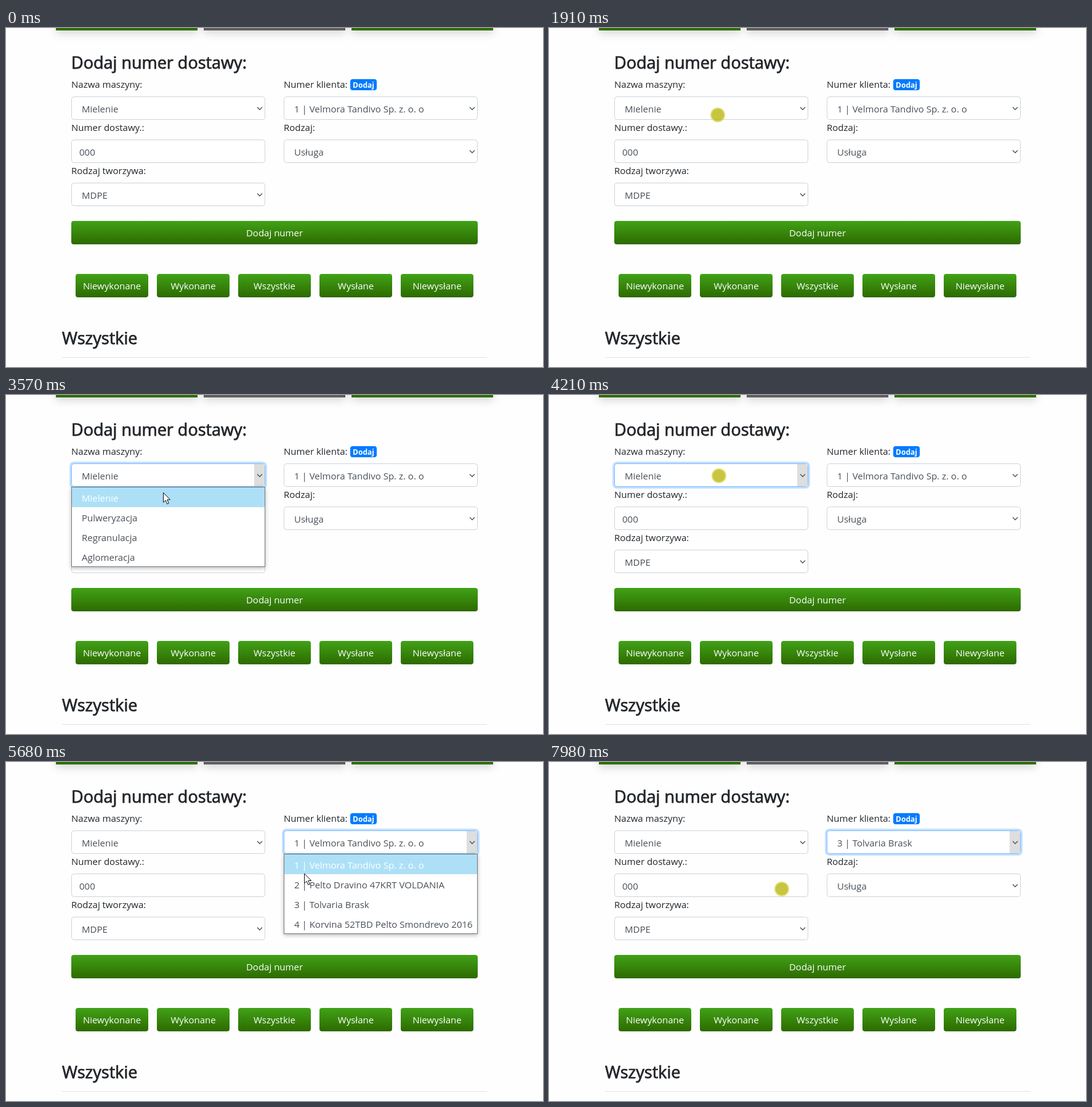
An HTML page that plays this animation: 872x550 px, repeating every 8 s.

```html
<!DOCTYPE html>
<html lang="pl">
<head>
<meta charset="utf-8">
<title>Dodaj numer dostawy</title>
<style>
  html, body { margin: 0; width: 100%; height: 100%; overflow: hidden; background: #fefefe; }
  svg { display: block; width: 100%; height: 100%; }
  text { font: 15px "Open Sans", "Noto Sans", sans-serif; fill: #212529; white-space: pre; }
  .heading { font-size: 27px; stroke: #212529; stroke-width: .75; }
  .value { fill: #495057; }
  .light { fill: #fff; text-anchor: middle; }
  .badge { font-size: 12px; font-weight: 700; }
  .box { fill: #fff; stroke: #ced4da; }
  .button { fill: url(#green); }
  .bar { filter: drop-shadow(0 5px 7px rgba(0, 0, 0, .15)); }
  .chevron { fill: none; stroke: #4c5a57; stroke-width: 1.4; }
  .ring, .arrowBox { visibility: hidden; }
  .ring { fill: none; stroke: #bfdeff; stroke-width: 3.2; }
  .focus .ring, .focus .arrowBox { visibility: visible; }
  .focus .box { stroke: #80bdff; }
  .arrowBox { fill: #dedede; }
  .menu { filter: drop-shadow(0 2px 3px rgba(0, 0, 0, .28)); }
  .frame { fill: #fff; stroke: #737b83; }
  .option rect { fill: none; }
  .option.hover rect { fill: #ade0f7; }
  .option.hover text { fill: #fff; }
  #spot { fill: rgba(184, 180, 10, .77); stroke: rgba(224, 222, 104, .85); stroke-width: 2; }
  #spot.pressed { fill: rgba(112, 112, 112, .78); stroke: rgba(175, 175, 175, .8); }
  #arrow { fill: #fff; stroke: #111; }
</style>
</head>
<body>
<svg viewBox="0 0 872 550">
  <defs>
    <linearGradient id="green" x2="0" y2="1">
      <stop stop-color="#41a217"/><stop offset="1" stop-color="#2d6a00"/>
    </linearGradient>
  </defs>
  <g id="page"></g>
  <g id="menus"></g>
  <g id="pointer">
    <circle id="spot" r="11"/>
    <path id="arrow" d="M.5 .5V16.2L4.1 12.9L6.7 18.8L9.3 17.7L6.7 11.9H11.6Z"/>
  </g>
</svg>
<script>
const LOOP = 8000;
const $ = id => document.getElementById(id);
const machines = ['Mielenie', 'Pulweryzacja', 'Regranulacja', 'Aglomeracja'];
const clients = [
  '1 | Velmora Tandivo Sp. z. o. o',
  '2 | Pelto Dravino 47KRT VOLDANIA',
  '3 | Tolvaria Brask',
  '4 | Korvina 52TBD Pelto Smondrevo 2016'
];

const text = (x, y, label, cls = '') => `<text x="${x}" y="${y}" class="${cls}">${label}</text>`;
const rect = (x, y, w, h, cls, r = 0, extra = '') =>
  `<rect x="${x}" y="${y}" width="${w}" height="${h}" rx="${r}" class="${cls}" ${extra}/>`;
const button = (x, y, w, label) =>
  rect(x, y, w, 38, 'button', 4) + text(x + w / 2, y + 25, label, 'light');
const input = (x, y, value) =>
  rect(x + .5, y + .5, 314, 37, 'box', 4) + text(x + 13, y + 26, value, 'value');
const select = (id, x, y, value) => `<g id="${id}">
  ${rect(x - 1.2, y - 1.2, 317.4, 40.4, 'ring', 5)}
  ${rect(x + .5, y + .5, 314, 37, 'box', 4)}
  ${rect(x + 297, y + 1, 17, 36, 'arrowBox')}
  <path class="chevron" d="M${x + 302} ${y + 17.5}l4 4 4-4"/>
  ${text(x + 17, y + 26, value, 'value')}</g>`;
const menu = (id, x, y, options) => `<g id="${id}" class="menu">
  ${rect(x + .5, y + .5, 314, 129, 'frame')}
  ${options.map((label, i) => `<g class="option">
    ${rect(x + 1, y + 1 + 32 * i, 313, 32, '')}
    ${text(x + 17, y + 24 + 32 * i, label, 'value')}</g>`).join('')}</g>`;

const LEFT = 106, RIGHT = 451;
const rowLabels = ['Nazwa maszyny:', 'Numer dostawy.:', 'Rodzaj tworzywa:'];
const filters = ['Niewykonane', 'Wykonane', 'Wszystkie', 'Wysłane', 'Niewysłane'];

$('page').innerHTML = [
  ...['#2f6f02', '#625f62', '#2f6f02'].map((color, i) =>
    rect(81 + 240 * i, -34, 230, 38, 'bar', 0, `fill="${color}"`)),
  text(LEFT, 66, 'Dodaj numer dostawy:', 'heading'),
  ...rowLabels.map((label, i) => text(LEFT, 97 + 70 * i, label)),
  ...['Numer klienta:', 'Rodzaj:'].map((label, i) => text(RIGHT, 97 + 70 * i, label)),
  rect(559, 83, 43, 18, '', 4, 'fill="#007bff"'),
  text(580.5, 97, 'Dodaj', 'light badge'),
  select('machine', LEFT, 111, machines[0]),
  input(LEFT, 181, '000'),
  select('material', LEFT, 251, 'MDPE'),
  select('client', RIGHT, 111, clients[0]),
  select('kind', RIGHT, 181, 'Usługa'),
  button(LEFT, 313, 660, 'Dodaj numer'),
  ...filters.map((label, i) => button(113 + 132 * i, 399, 118, label)),
  text(91, 513, 'Wszystkie', 'heading'),
  rect(91, 534, 690, 1, '', 0, 'fill="#e4e4e4"')
].join('');
$('menus').innerHTML =
  menu('machineMenu', LEFT, 149, machines) + menu('clientMenu', RIGHT, 149, clients);

// Each move starts where the previous one ended; "via" bends it into a curve.
const start = [792, 548];
const moves = [
  { from: 320, until: 1100, to: [287, 162], via: [740, 370] },
  { from: 1130, until: 1290, to: [274, 141] },
  { from: 2480, until: 2980, to: [251, 188] },
  { from: 3430, until: 3570, to: [255, 158] },
  { from: 3720, until: 4240, to: [276, 131] },
  { from: 4240, until: 4850, to: [488, 136] },
  { from: 5460, until: 6110, to: [481, 215] },
  { from: 7440, until: 7980, to: [378, 206], via: [510, 214] }
];

// Press on the select, menu opens, arrow appears, highlight follows, option chosen, button released.
const picks = [
  { id: 'machine', press: 2050, open: 2140, arrow: 2480, hover: 2480, close: 3750, release: 3820 },
  { id: 'client', press: 5030, open: 5150, arrow: 5460, hover: 6250, close: 6800, release: 7470 }
];

const easeOut = k => 1 - (1 - k) ** 2;
const within = (t, from, until) => t >= from && t < until;
const show = (id, on) => $(id).style.visibility = on ? 'visible' : 'hidden';

function pointerAt(t) {
  let point = start;
  for (const { from, until, to, via } of moves) {
    if (t < from) break;
    const k = easeOut(Math.min(1, (t - from) / (until - from)));
    point = point.map((a, i) => {
      const bend = via ? via[i] : (a + to[i]) / 2;
      return a * (1 - k) ** 2 + 2 * bend * k * (1 - k) + to[i] * k * k;
    });
  }
  return point;
}

function draw(t) {
  const [x, y] = pointerAt(t);
  const current = picks.filter(pick => t >= pick.press).pop();

  for (const pick of picks) {
    const hovered = t < pick.hover ? 0 : Math.max(0, Math.floor((y - 150) / 32));
    $(pick.id).classList.toggle('focus', pick === current);
    show(pick.id + 'Menu', within(t, pick.open, pick.close));
    $(pick.id + 'Menu').querySelectorAll('.option')
      .forEach((option, i) => option.classList.toggle('hover', i === hovered));
  }
  $('client').querySelector('text').textContent = clients[t < picks[1].close ? 0 : 2];

  const arrow = picks.some(pick => within(t, pick.arrow, pick.close));
  const pressed = picks.some(pick => within(t, pick.press, pick.release));
  show('arrow', arrow);
  show('spot', t >= moves[0].from && !arrow);
  $('spot').classList.toggle('pressed', pressed);
  $('pointer').setAttribute('transform', `translate(${x} ${y})`);
}

function tick() {
  draw(performance.now() % LOOP);
  requestAnimationFrame(tick);
}
tick();
</script>
</body>
</html>
```
